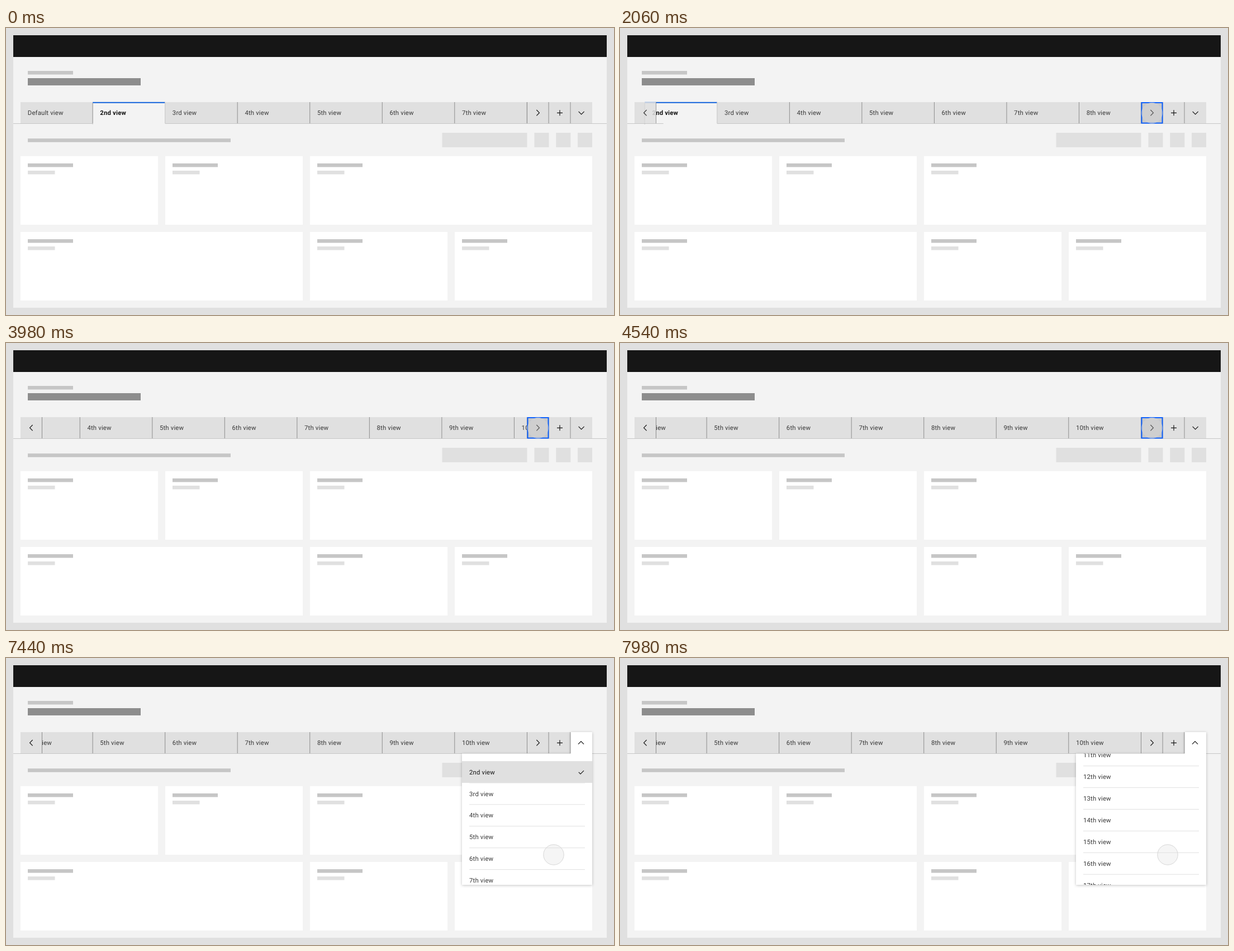
An HTML page that plays this animation: 1088 px wide and 515 px high, repeating every 8000 ms.

```html
<!DOCTYPE html>
<html lang="en">
<head>
<meta charset="utf-8">
<title>Scrolling tabs</title>
<style>
  html, body { margin: 0; width: 100%; height: 100%; overflow: hidden; background: #e0e0e0; }
  svg { display: block; width: 1088px; height: 515px; }
  text {
    font: 11.34px Roboto, "Open Sans", sans-serif;
    letter-spacing: .17px;
    fill: #393939;
    text-rendering: geometricPrecision;
  }
  .strong { font-weight: 700; fill: #161616; }
  .dark { fill: #161616; }
  .icon { fill: none; stroke: #161616; stroke-width: 1.2; }
  #menu { filter: drop-shadow(0 1.5px 2.5px rgba(0, 0, 0, .24)); }
</style>
</head>
<body>
<svg id="stage" viewBox="0 0 1088 515"></svg>
<script>
const LOOP = 8000;
const TAB = 129.53, ROW = 38.9, MENU_Y = 171.4;
const PAGE = '#f3f3f3', GREY = '#e0e0e0', MID = '#c6c6c6', LINE = '#8d8d8d', HOVER = '#c8c8c8';

const rect = (x, y, w, h, fill, extra = '') =>
  `<rect x="${x}" y="${y}" width="${w}" height="${h}" fill="${fill}" ${extra}/>`;
const text = (x, y, label, cls = '') => `<text x="${x}" y="${y}" class="${cls}">${label}</text>`;
const icon = d => `<path class="icon" d="${d}"/>`;

const viewName = i => {
  const n = i + 1;
  return n === 1 ? 'Default view' : n + ({ 2: 'nd', 3: 'rd' }[n] || 'th') + ' view';
};

const card = (x, y, w) =>
  rect(x, y, w, 123, '#fff') +
  rect(x + 13, y + 13, 81, 6.5, MID) +
  rect(x + 13, y + 26, 48.5, 6.5, GREY);

function page() {
  const cards = [[26, 230, 246], [285, 230, 246], [544, 230, 505],
                 [26, 366, 505], [544, 366, 246], [803, 366, 246]];
  return rect(0, 0, 1088, 515, GREY) +
    rect(13, 13, 1062, 489, PAGE) +
    rect(13, 13, 1062, 39, '#161616') +
    rect(39, 77, 81, 6.5, MID) +
    rect(39, 90, 202, 13, LINE) +
    rect(39, 198.3, 363, 6.5, MID) +
    rect(780.5, 188, 152, 26, GREY) +
    [945.5, 984.3, 1023].map(x => rect(x, 188, 26, 26, GREY)).join('') +
    cards.map(c => card(...c)).join('');
}

function tab(i) {
  const x = 25.6 + i * TAB, on = i === 1;
  return rect(x, 133, TAB + .5, 38.5, on ? PAGE : GREY) +
    (on ? rect(x, 132.8, TAB, 2, '#1464dc') : '') +
    (i ? rect(x - .5, on ? 134.5 : 133, 1, 38, i === 2 ? MID : LINE) : '') +
    text(x + 13.2, 156.3, viewName(i), on ? 'strong' : '');
}

function menuRow(i) {
  const y = MENU_Y + i * ROW, on = i === 1;
  return (on ? rect(816, y, 233, ROW, GREY) + icon(`M1024.8 ${y + 19.8}l3.2 3.2 6-6`) : '') +
    (i ? rect(829, y + ROW - .5, 207, 1, GREY) : '') +
    text(829, y + 23.6, viewName(i), on ? 'dark' : '');
}

const list = (n, make) => Array.from({ length: n }, (_, i) => make(i)).join('');

document.getElementById('stage').innerHTML = `
  <defs>
    <clipPath id="tabClip"><rect x="26" y="130" width="906.5" height="45"/></clipPath>
    <clipPath id="menuClip"><rect x="816" y="171.5" width="233" height="235.5"/></clipPath>
  </defs>
  ${page()}
  <g clip-path="url(#tabClip)"><g id="tabs">${list(10, tab)}</g></g>
  <g id="back">
    ${rect(26, 133, 38.5, 38.5, GREY)}${rect(64, 133, 1, 38, LINE)}
    ${icon('M47.6 147l-5 5.2 5 5.2')}
  </g>
  ${rect(932.5, 133, 116.5, 38.5, GREY)}
  ${rect(932.5, 133, 38.5, 38, HOVER, 'id="nextHover"')}
  ${rect(1010, 133, 39, 38, HOVER, 'id="moreHover"')}
  ${[932, 970.6, 1009.5].map(x => rect(x, 133, 1, 38, LINE)).join('')}
  ${rect(13, 171, 1062, 1, MID)}
  ${rect(0, 171, 0, 1, PAGE, 'id="gap"')}
  ${icon('M949.4 147l5 5.2-5 5.2')}
  ${icon('M986 152.3h10M991 147.3v10')}
  ${icon('M1024.6 149.8l5 5 5-5')}
  <rect id="focus" x="933.5" y="134" width="37" height="36.6" fill="none" stroke="#0f62fe" stroke-width="2"/>
  <g id="menu">
    <path d="M1010.5 133H1049V407H816V171.5H1010.5z" fill="#fff"/>
    ${icon('M1024 154.6l5-5 5 5')}
    <g clip-path="url(#menuClip)"><g id="rows">${list(18, menuRow)}</g></g>
  </g>
  <circle id="cursor" r="18.2" fill="rgba(220,220,220,.3)" stroke="rgba(208,208,208,.85)"/>`;

const el = {};
document.querySelectorAll('[id]').forEach(node => el[node.id] = node);

function bezier(x1, y1, x2, y2) {
  const at = (a, b, s) => 3 * a * s * (1 - s) ** 2 + 3 * b * s * s * (1 - s) + s ** 3;
  return x => {
    if (x <= 0) return 0;
    if (x >= 1) return 1;
    let lo = 0, hi = 1;
    for (let i = 0; i < 24; i++) {
      const mid = (lo + hi) / 2;
      if (at(x1, x2, mid) < x) lo = mid; else hi = mid;
    }
    return at(y1, y2, lo);
  };
}
const ease = bezier(.25, .1, .25, 1);
const easeOut = bezier(0, 0, .58, 1);
const easeInOut = bezier(.42, 0, .58, 1);
const ramp = (t, start, span, fn = ease) => fn((t - start) / span);
const mix = (a, b, p) => a + (b - a) * p;

// start, span, x, y, curve, downward bend
const LEGS = [
  [300, 820, 961, 155, easeInOut, 0],
  [1120, 360, 952, 152.5, easeOut, 0],
  [4620, 720, 1023, 152, easeInOut, 6],
  [5340, 240, 1027.5, 149.8, easeOut, 0],
  [6080, 200, 1027.5, 152.5, easeOut, 0],
  [6620, 580, 980, 353, easeInOut, 0]
];

function cursorAt(t) {
  let x = 1036, y = -20;
  for (const [start, span, tx, ty, fn, bend] of LEGS) {
    const p = ramp(t, start, span, fn);
    x = mix(x, tx, p);
    y = mix(y, ty, p) + bend * Math.sin(Math.PI * p);
  }
  return [x, y];
}

const fade = (node, value) => node.setAttribute('opacity', value);
const move = (node, x, y) => node.setAttribute('transform', `translate(${x} ${y})`);

function draw(t) {
  const a = ramp(t, 1865, 350), b = ramp(t, 2860, 360), c = ramp(t, 3930, 350);
  const open = ramp(t, 6085, 215);

  move(el.tabs, -TAB * (a + b + c), 0);
  fade(el.back, a);

  const left = mix(mix(155.6, 64.5, a), 155, b);
  const right = mix(284.6, 155, a);
  el.gap.setAttribute('x', left);
  el.gap.setAttribute('width', Math.max(0, right - left));

  fade(el.nextHover, ramp(t, 980, 140) * (1 - open));
  fade(el.focus, ramp(t, 1865, 200) * (1 - open));
  fade(el.moreHover, ramp(t, 5160, 180));

  fade(el.menu, open);
  move(el.rows, 0, -405.6 * ramp(t, 7420, 560, easeOut));
  move(el.cursor, ...cursorAt(t));
}

const begin = performance.now();
function tick() {
  draw((performance.now() - begin) % LOOP);
  requestAnimationFrame(tick);
}
tick();
</script>
</body>
</html>
```
